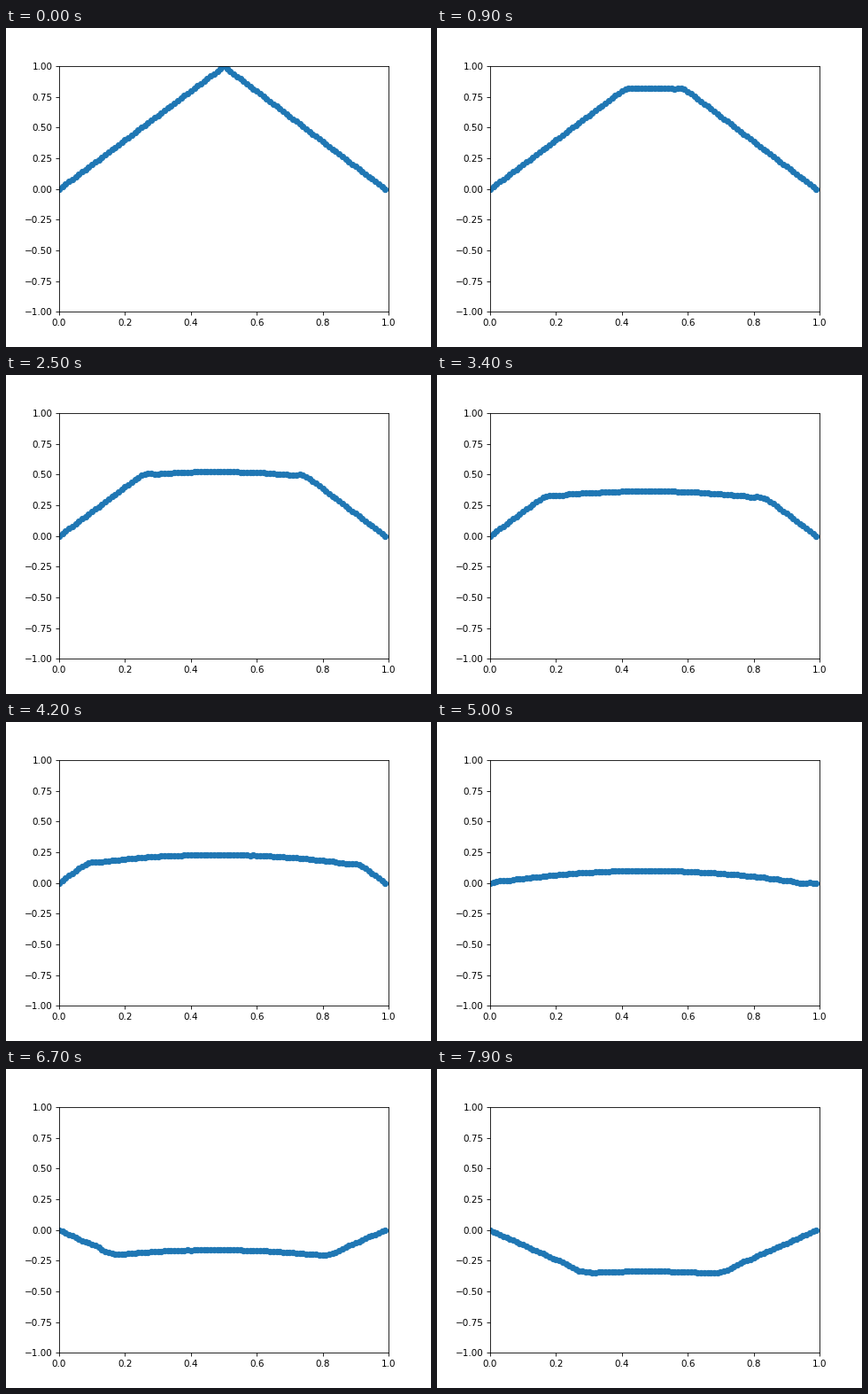
Recreate the animation shown at these times as a matplotlib script. Size 480 by 360 pixels, loop 8000 ms.

```python
import numpy as np
import matplotlib.pyplot as plt
from matplotlib.animation import FuncAnimation

FRAMES = 80
INTERVAL = 100      # ms per frame
SUBSTEPS = 10       # solver steps per frame
DX, DT = 0.01, 0.001
SPEED, DAMPING = 1.0, 1.0

x = np.arange(100) * DX


def pluck(x, peak=0.5):
    """Triangular start shape, fixed at both ends."""
    end = x[-1]
    return np.where(x <= peak, x / peak, (end - x) / (end - peak))


def simulate():
    """Damped wave equation on a string, one row per frame."""
    u = pluck(x)
    v = np.zeros_like(u)
    rows = [u.copy()]
    for _ in range(FRAMES - 1):
        for _ in range(SUBSTEPS):
            curve = (u[2:] - 2 * u[1:-1] + u[:-2]) / DX**2
            v[1:-1] += DT * (SPEED**2 * curve - DAMPING * v[1:-1])
            u += DT * v
        rows.append(u.copy())
    return rows


shapes = simulate()

fig, ax = plt.subplots(figsize=(6.4, 4.8), dpi=75)
ax.set_xlim(0, 1)
ax.set_ylim(-1, 1)
(string,) = ax.plot(x, shapes[0], "o", color="C0")


def draw(i):
    string.set_ydata(shapes[i])
    return (string,)


anim = FuncAnimation(fig, draw, frames=FRAMES, interval=INTERVAL,
                     repeat=True, repeat_delay=0)
plt.show()
```
